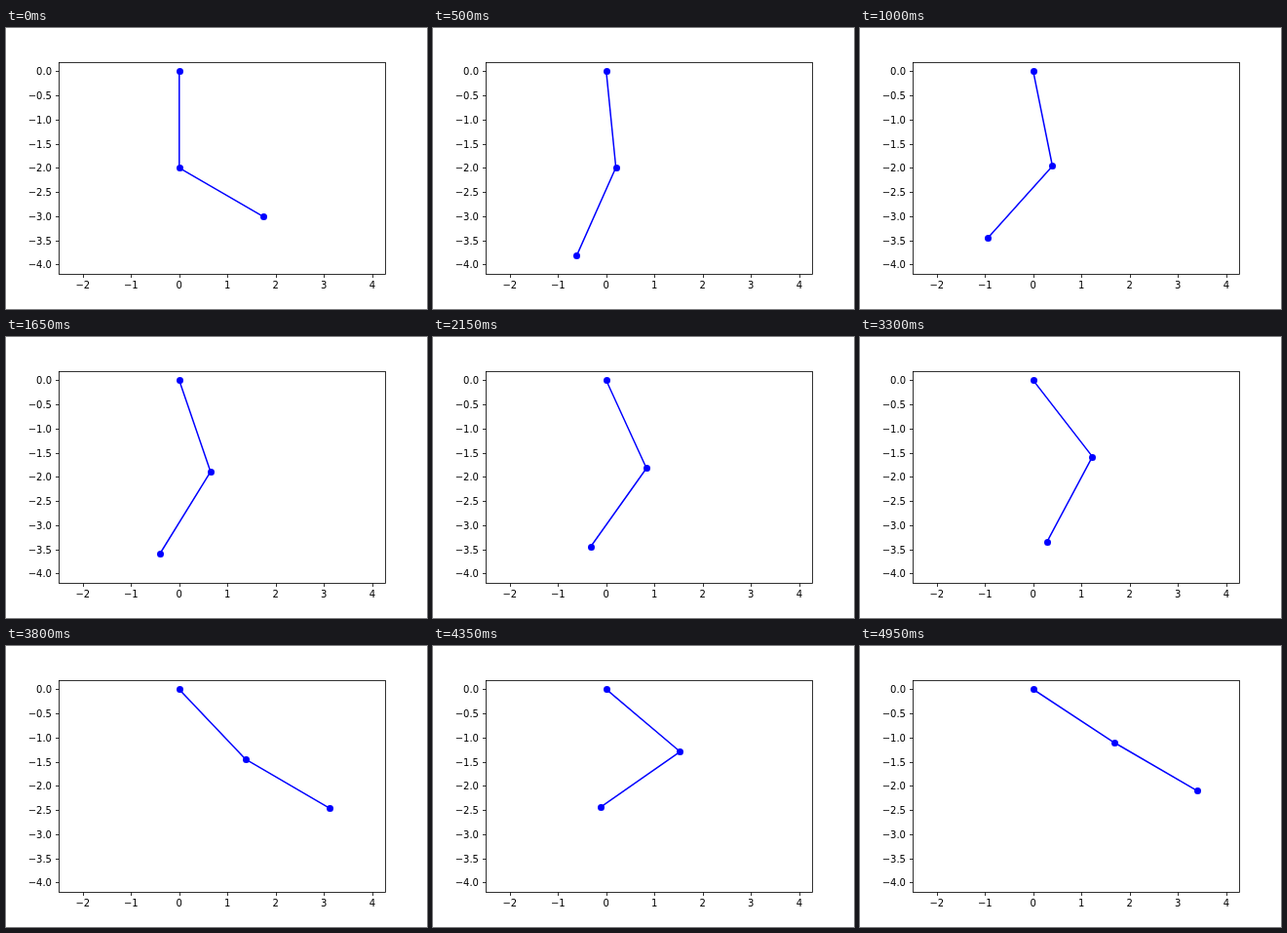
Recreate the animation shown at these times as an HTML page. Size 432 by 288 pixels, loop 5 s.

```html
<!DOCTYPE html>
<html lang="en">
<head>
<meta charset="utf-8">
<title>Double arm plot</title>
<style>
  html, body { margin: 0; width: 100%; height: 100%; overflow: hidden; background: #fff; }
  svg { display: block; width: 432px; height: 288px; }
  text { font: 10px "DejaVu Sans", sans-serif; fill: #000; }
  .axis { fill: none; stroke: #000; stroke-width: 0.8; }
  .arm { fill: none; stroke: #00f; stroke-width: 1.5; stroke-linejoin: round; stroke-linecap: square; }
  circle { fill: #00f; }
</style>
</head>
<body>
<svg id="plot" viewBox="0 0 432 288"></svg>
<script>
const STEP = 50, STEPS = 100;
const LENGTH = 2, SCALE = 49.51, X0 = 177.78, Y0 = 44.44;
const AMPLITUDE = Math.PI / 3, PERIOD = 7.609;

const plot = document.getElementById('plot');

function add(tag, attrs, text) {
  const el = document.createElementNS('http://www.w3.org/2000/svg', tag);
  for (const key in attrs) el.setAttribute(key, attrs[key]);
  if (text) el.textContent = text;
  return plot.appendChild(el);
}

const toX = x => X0 + x * SCALE;
const toY = y => Y0 - y * SCALE;
const snap = v => Math.floor(v + 0.5) + 0.5;
const label = (v, digits) => (v < 0 ? '\u2212' : '') + Math.abs(v).toFixed(digits);

function drawAxes() {
  add('rect', { x: 54.5, y: 35.5, width: 335, height: 217, class: 'axis' });
  for (let v = -2; v <= 4; v++) {
    add('path', { d: `M${snap(toX(v))} 252.5v3.5`, class: 'axis' });
    add('text', { x: toX(v), y: 267, 'text-anchor': 'middle' }, label(v, 0));
  }
  for (let v = 0; v >= -4; v -= 0.5) {
    const y = snap(toY(v));
    add('path', { d: `M54.5 ${y}h-3.5`, class: 'axis' });
    add('text', { x: 47, y: y + 3.5, 'text-anchor': 'end' }, label(v, 1));
  }
}

// Large-angle pendulum: cosine plus a small third harmonic.
function swing(n) {
  const phase = 2 * Math.PI * n / PERIOD;
  const e = AMPLITUDE ** 3 / 192;
  return (AMPLITUDE + e) * Math.cos(phase) - e * Math.cos(3 * phase);
}

function joints(n) {
  const points = [[0, 0]];
  for (const angle of [n * 0.01, swing(n)]) {
    const [x, y] = points[points.length - 1];
    points.push([x + LENGTH * Math.sin(angle), y - LENGTH * Math.cos(angle)]);
  }
  return points.map(([x, y]) => [toX(x), toY(y)]);
}

drawAxes();
const arm = add('polyline', { class: 'arm' });
const dots = [0, 1, 2].map(() => add('circle', { r: 3.5 }));

function render(time) {
  const points = joints(Math.floor(time / STEP + 1e-6) % STEPS);
  arm.setAttribute('points', points.join(' '));
  points.forEach(([x, y], i) => {
    dots[i].setAttribute('cx', snap(x));
    dots[i].setAttribute('cy', snap(y));
  });
}

const start = performance.now();
function tick() {
  render(performance.now() - start);
  requestAnimationFrame(tick);
}
tick();
</script>
</body>
</html>
```
